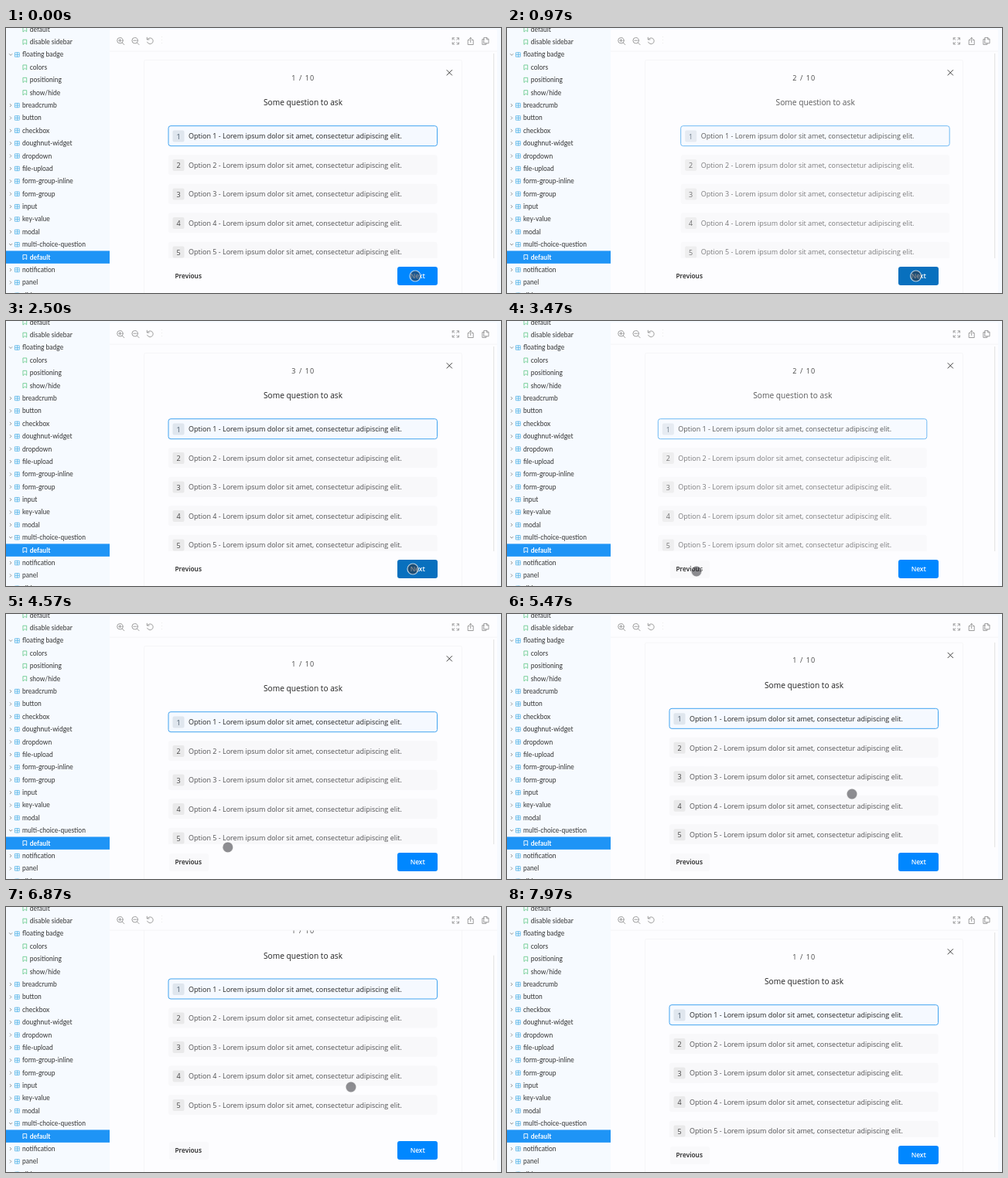
An HTML page that plays this animation: 640 px wide and 343 px high, repeating every 8.01 s.

```html
<!DOCTYPE html>
<html lang="en">
<head>
<meta charset="utf-8">
<title>Multi choice question</title>
<style>
  html, body { margin: 0; width: 100%; height: 100%; overflow: hidden; background: #f6faff; }
  svg { display: block; width: 640px; height: 343px; font: 9px "Open Sans", "Noto Sans", sans-serif; }
  .side { font: 8.5px Lato, "Open Sans", sans-serif; fill: #333; }
  .mid { text-anchor: middle; }
  .btn { font-size: 8.4px; font-weight: 600; text-anchor: middle; }
  .line { fill: none; stroke-linecap: round; stroke-linejoin: round; }
</style>
</head>
<body>
<svg viewBox="0 0 640 343">
  <rect width="640" height="343" fill="#f6faff"/>
  <g id="side" class="side"></g>
  <rect x="134" y="2" width="501" height="345" rx="3" fill="#fdfdff"/>

  <g id="page">
    <rect x="178.5" y="41.5" width="411" height="400" rx="2" fill="#fdfdff" stroke="#f6f6f7"/>
    <path class="line" d="M570 54.5l6.6 6.6m0-6.6l-6.6 6.6" stroke="#444"/>
    <text id="count" class="mid" x="384.3" y="67.8" letter-spacing="1.1" fill="#444"></text>
    <g id="slide">
      <text class="mid" x="384" y="100.4" font-size="10.2" fill="#222">Some question to ask</text>
    </g>
  </g>

  <g id="foot">
    <rect x="180" y="298" width="409" height="100" fill="#fdfdff"/>
    <rect id="prevBg" x="211" y="310" width="51" height="23" rx="3" fill="#f9f9fb"/>
    <text class="btn" x="235.7" y="324.4" fill="#222">Previous</text>
    <rect id="next" x="506" y="309" width="52" height="24" rx="3"/>
    <text class="btn" x="532.2" y="324.4" fill="#fff">Next</text>
  </g>

  <rect id="thumb" x="630" width="1.2" height="265" fill="#e6e6e6"/>
  <rect x="134" y="2" width="501" height="28" rx="3" fill="#fdfdff"/>
  <path d="M134 30h501" stroke="#f4f4f6"/>
  <path d="M201.5 11v12" stroke="#ececec" stroke-dasharray="1 3"/>
  <g class="line" stroke="#929292" stroke-width=".9">
    <g id="lens"><circle cx="147.4" cy="16.2" r="3.7"/><path d="M150.2 19l2.6 2.6M145.6 16.2h3.6"/></g>
    <use href="#lens" x="19.2"/>
    <path d="M147.4 14.4v3.6"/>
    <path d="M183 14.6a3.9 3.9 0 1 1-.4 3.6M182.3 12.2v2.8h2.8"/>
    <path d="M577.2 15.2v-2.4h2.4M583 12.8h2.4v2.4M585.4 18.6v2.4H583M579.6 21h-2.4v-2.4M577.4 13l2.4 2.4M585.2 13l-2.4 2.4M585.2 20.8l-2.4-2.4M577.4 20.8l2.4-2.4"/>
    <path d="M599 15.5h-1.8v6h7v-6h-1.8M600.7 18.5v-6M598.9 14.2l1.8-1.9 1.8 1.9"/>
    <path d="M618.2 14.6h-2.4v6.8h5v-1.6M618.2 12.4h3.6l2.2 2.2v5.2h-5.8zM621.6 12.6v2.2h2.2"/>
  </g>

  <circle id="cursor" r="7" fill="rgba(50,50,55,.55)" stroke="rgba(255,255,255,.7)" stroke-width="1.2"/>
</svg>
<script>
const $ = id => document.getElementById(id);
const add = (id, html) => $(id).insertAdjacentHTML('beforeend', html);
const clamp = v => Math.min(1, Math.max(0, v));
const ramp = (t, start, length) => clamp((t - start) / length);
const inOut = p => p < .5 ? 2 * p * p : 1 - 2 * (1 - p) ** 2;

// Sidebar: "-" marks a story, "+" an expanded component.
const rows = ['-default', '-disable sidebar', '+floating badge', '-colors', '-positioning', '-show/hide',
  'breadcrumb', 'button', 'checkbox', 'doughnut-widget', 'dropdown', 'file-upload', 'form-group-inline',
  'form-group', 'input', 'key-value', 'modal', '+multi-choice-question', '-default', 'notification',
  'panel', 'slider'];
rows.forEach((row, i) => {
  const y = 1.8 + 16.38 * i, name = row.replace(/^[-+]/, ''), active = i === 18;
  if (active) add('side', `<rect y="${y - 8.2}" width="134" height="16.4" fill="#1e94f6"/>`);
  if (row[0] === '-') {
    add('side', `<path class="line" d="M22.3 ${y - 3}h4.4v6l-2.2-1.8-2.2 1.8z" stroke="${active ? '#fff' : '#6ccc90'}" stroke-width=".9"/>
      <text x="30.7" y="${y + 2.9}" ${active ? 'fill="#fff" font-weight="700"' : ''}>${name}</text>`);
  } else {
    const caret = row[0] === '+' ? `M4.4 ${y - .9}l1.7 1.8 1.7-1.8` : `M5.2 ${y - 1.7}l1.7 1.7-1.7 1.7`;
    add('side', `<path class="line" d="${caret}" stroke="#888" stroke-width=".9"/>
      <path class="line" d="M11.8 ${y - 2.7}h5.4v5.4h-5.4zM14.5 ${y - 2.7}v5.4M11.8 ${y}h5.4" stroke="#55b4e8" stroke-width=".8"/>
      <text x="21" y="${y + 2.9}">${name}</text>`);
  }
});

for (let n = 1; n <= 5; n++) {
  const y = 102.6 + 37.5 * n, on = n === 1;
  add('slide', `<rect x="210" y="${y - 13.4}" width="347.5" height="26" rx="3" fill="${on ? '#f5f9ff' : '#f8f8fa'}"
      stroke="${on ? '#42a4f0' : 'none'}"/>
    <rect x="215.5" y="${y - 7.5}" width="15" height="15" rx="2" fill="${on ? '#dfe6ee' : '#e9e9ea'}"/>
    <text class="mid" x="223" y="${y + 3.5}" fill="${on ? '#456' : '#444'}">${n}</text>
    <text x="236" y="${y + 3.3}" fill="${on ? '#222' : '#505052'}">Option ${n} - Lorem ipsum dolor sit amet, consectetur adipiscing elit.</text>`);
}

const LOOP = 8010, LEAVE = 150, ENTER = 300, SHIFT = 33;
const clicks = [[750, 2, 1], [1850, 3, 1], [3250, 2, -1], [3930, 1, -1]]; // time, page, direction
const path = [[0, 529, 321], [1630, 528.5, 321], [2500, 526, 321], [2620, 526, 321], [3150, 245, 324],
  [3500, 245, 324], [4350, 245, 320], [5035, 446, 233], [7500, 446, 233], [7950, 508, 284]];

function pointer(t) {
  const i = path.findIndex(p => p[0] > t);
  if (i < 0) return path.at(-1).slice(1);
  const [t0, x0, y0] = path[i - 1], [t1, x1, y1] = path[i];
  const p = inOut((t - t0) / (t1 - t0));
  return [x0 + (x1 - x0) * p, y0 + (y1 - y0) * p];
}

function question(t) {
  let page = 1, x = 0, alpha = 1;
  for (const [start, to, dir] of clicks) {
    const age = t - start;
    if (age < 0) break;
    if (age < LEAVE) {
      const p = (age / LEAVE) ** 2;
      x = -dir * SHIFT * p;
      alpha = 1 - p;
    } else {
      const p = 1 - (1 - ramp(age, LEAVE, ENTER)) ** 3;
      page = to;
      x = dir * SHIFT * (1 - p);
      alpha = Math.sqrt(p);
    }
  }
  return { page, x, alpha };
}

const move = (id, x, y) => $(id).setAttribute('transform', `translate(${x} ${y})`);

function draw(t) {
  const { page, x, alpha } = question(t);
  $('count').textContent = `${page} / 10`;
  move('slide', x, 0);
  $('slide').setAttribute('opacity', alpha);

  const scroll = 36.7 * (inOut(ramp(t, 5300, 700)) - inOut(ramp(t, 6750, 600)));
  move('page', 0, -scroll);
  move('foot', 0, Math.min(0, 27.7 - scroll)); // sticks to the bottom until its own place is reached
  $('thumb').setAttribute('y', 33 + scroll * .88);

  const hover = ramp(t, 0, 150) - ramp(t, 2700, 150);
  const mix = (a, b) => a + (b - a) * hover;
  $('next').setAttribute('fill', `rgb(${mix(0, 8)},${mix(135, 112)},${mix(255, 190)})`);
  $('prevBg').setAttribute('opacity', ramp(t, 3000, 150));

  move('cursor', ...pointer(t));
  $('cursor').setAttribute('visibility', t < 7960 ? 'visible' : 'hidden');
}

const begin = performance.now();
(function tick() {
  draw((performance.now() - begin) % LOOP);
  requestAnimationFrame(tick);
})();
</script>
</body>
</html>
```
